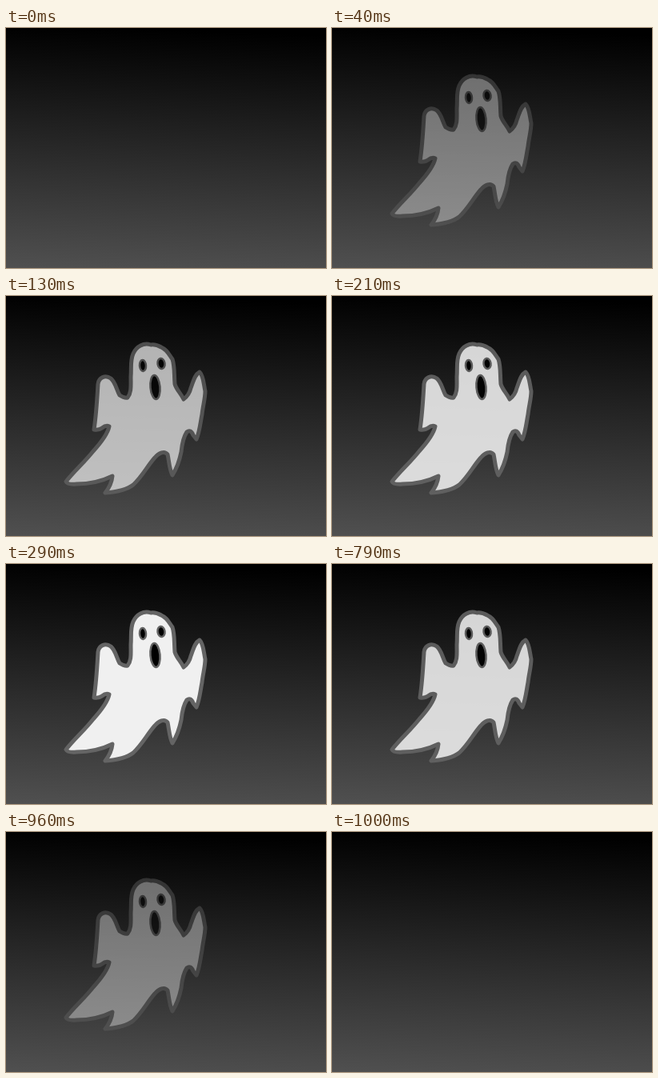
Recreate the animation shown at these times as an HTML page. Size 400 by 300 pixels, loop 1040 ms.

```html
<!DOCTYPE html>
<html lang="en">
<head>
<meta charset="utf-8">
<title>Ghost</title>
<style>
  html, body { margin: 0; width: 100%; height: 100%; overflow: hidden; }
  body { background: linear-gradient(182deg, #000 3%, #505050); }
  svg { display: block; width: 400px; height: 300px; }

  .ghost {
    opacity: 0;
    stroke: #646464;
    stroke-linejoin: round;
    animation: haunt 1040ms step-end infinite;
  }
  .body { fill: #f0f0f0; stroke-width: 5; }
  .face { fill: #000; stroke-width: 2.5; }

  /* stepped fade in, hold, stepped fade out */
  @keyframes haunt {
    0% { opacity: 0; }
    3.846% { opacity: .43; }
    7.692% { opacity: .6; }
    12.5% { opacity: .73; }
    16.346% { opacity: .82; }
    20.192% { opacity: .89; }
    27.885% { opacity: 1; }
    75.962% { opacity: .89; }
    84.615% { opacity: .73; }
    88.462% { opacity: .6; }
    92.308% { opacity: .43; }
    96.154%, 100% { opacity: 0; }
  }
</style>
</head>
<body>
<svg viewBox="0 0 400 300">
  <g class="ghost">
    <path class="body" d="M181 61
      C172 58 163 63 159 72 C155 81 157 90 156 101 C156 112 157 121 152 127
      Q148 128 142 124 C138 117 137 108 131 103 C124 98 116 102 115 110
      C114 127 113 147 110 167 Q116 168 120 165 Q125 161 129 163
      C127 173 118 184 109 194 C98 208 85 219 75 232 Q77 236 88 235
      C105 235 119 232 133 225 Q132 236 124 246
      C138 245 150 243 159 236 C170 226 177 212 186 202
      C191 196 198 193 202 198 C204 207 204 216 208 224
      C213 216 217 205 219 195 C220 185 222 176 226 170
      Q231 166 234 174 L238 179 C242 170 243 158 245 148
      C246 138 249 128 249 119 C247 110 247 100 242 95
      C235 99 234 108 231 115 Q229 124 222 129
      C218 121 213 117 211 110 C210 98 211 88 208 79
      C203 72 201 67 194 64 Q187 60 181 61 Z"/>
    <g class="face">
      <ellipse cx="171" cy="87" rx="4" ry="7" transform="rotate(-4 171 87)"/>
      <ellipse cx="194" cy="84.5" rx="4.5" ry="6.5" transform="rotate(-8 194 84.5)"/>
      <ellipse cx="186.5" cy="114" rx="6" ry="15" transform="rotate(-5 186.5 114)"/>
    </g>
  </g>
</svg>
</body>
</html>
```
